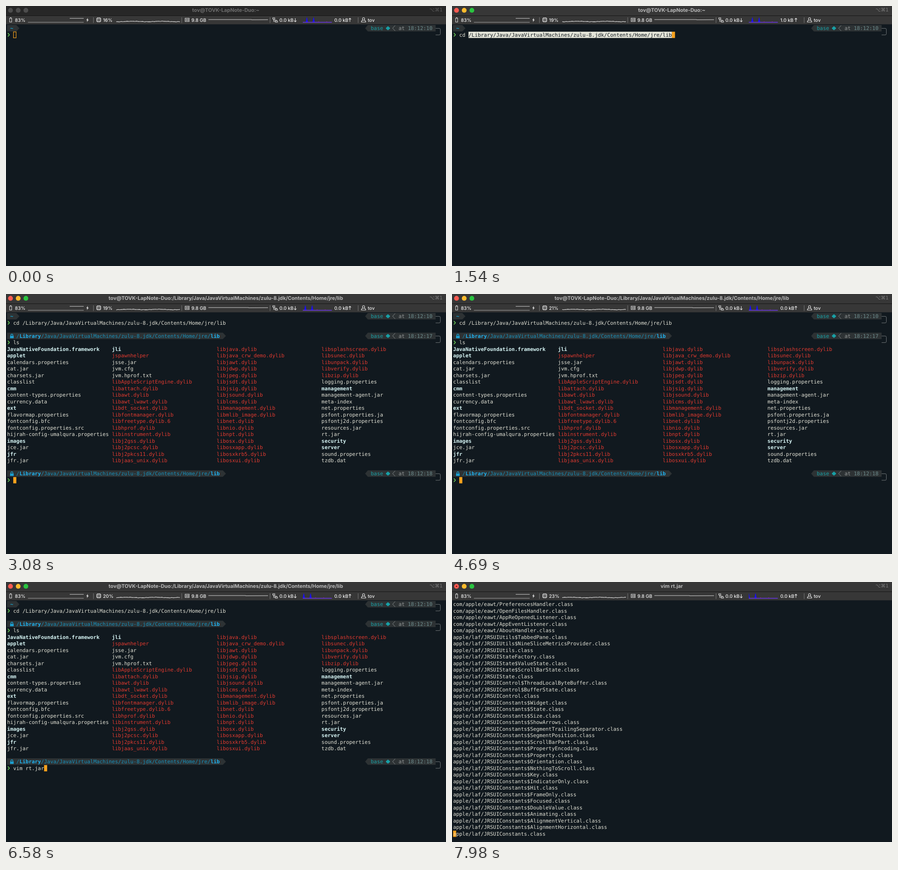
These frames come from a looping animation (974 by 575 pixels, 8 s). An HTML page with a canvas:

```html
<!DOCTYPE html>
<html lang="en">
<head>
<meta charset="utf-8">
<title>Terminal session</title>
<style>
html, body { margin: 0; width: 100%; height: 100%; overflow: hidden; background: #11191f; }
canvas { display: block; }
</style>
</head>
<body>
<canvas id="stage" width="974" height="575"></canvas>
<script>
const ctx = document.getElementById('stage').getContext('2d');
const LOOP = 8000, STEP = 70;
const CELL = 6.823, LINE = 14.5, LEFT = 2.4, TOP = 41.75;
const MONO = '11.333px "DejaVu Sans Mono", monospace';
const BG = '#11191f', FG = '#e2e2d6', RED = '#e03a30', ORANGE = '#f7a11c', SEGMENT = '#2d3234';
const USER = 'tov', HOST = 'TOVK-LapNote-Duo';
const PATH = '/Library/Java/JavaVirtualMachines/zulu-8.jdk/Contents/Home/jre/lib';

// Moments of the session in ms
const FOCUS = 350, PASTE = 1400, CD_DONE = 1960, LS_DONE = 2800;
const VIM_ENTER = 6650, VIM_CLEAR = 6720, VIM_READY = 6790, MODIFIED = 7210;
const CD_KEYS = [840, 980, 1120];
const LS_KEYS = [2310, 2450];
const VIM_KEYS = [5320, 5460, 5530, 5740, 5880, 6020, 6160, 6300, 6440, 6510];
const TICKS = [700, 1700, 2700, 3690, 4690, 5690, 6700, 7700];
const CPU = [16, 19, 19, 19, 20, 21, 20, 21, 23];

const LISTING = [
  'JavaNativeFoundation.framework applet calendars.properties cat.jar charsets.jar classlist cmm content-types.properties currency.data ext flavormap.properties fontconfig.bfc fontconfig.properties.src hijrah-config-umalqura.properties images jce.jar jfr jfr.jar',
  'jli jspawnhelper jsse.jar jvm.cfg jvm.hprof.txt libAppleScriptEngine.dylib libattach.dylib libawt.dylib libawt_lwawt.dylib libdt_socket.dylib libfontmanager.dylib libfreetype.dylib.6 libhprof.dylib libinstrument.dylib libj2gss.dylib libj2pcsc.dylib libj2pkcs11.dylib libjaas_unix.dylib',
  'libjava.dylib libjava_crw_demo.dylib libjawt.dylib libjdwp.dylib libjpeg.dylib libjsdt.dylib libjsig.dylib libjsound.dylib liblcms.dylib libmanagement.dylib libmlib_image.dylib libnet.dylib libnio.dylib libnpt.dylib libosx.dylib libosxapp.dylib libosxkrb5.dylib libosxui.dylib',
  'libsplashscreen.dylib libsunec.dylib libunpack.dylib libverify.dylib libzip.dylib logging.properties management management-agent.jar meta-index net.properties psfont.properties.ja psfontj2d.properties resources.jar rt.jar security server sound.properties tzdb.dat'
].map(column => column.split(' '));
const FOLDERS = new Set('JavaNativeFoundation.framework applet cmm ext images jfr jli management security server'.split(' '));

const classes = (prefix, names) => names.split(' ').map(name => prefix + name + '.class');
const VIM_LINES = [
  ...classes('com/apple/eawt/', 'PreferencesHandler OpenFilesHandler AppReOpenedListener AppEventListener AboutHandler'),
  ...classes('apple/laf/JRSUI', 'Utils$TabbedPane Utils$NineSliceMetricsProvider Utils StateFactory State$ValueState State$ScrollBarState State Control$ThreadLocalByteBuffer Control$BufferState Control'),
  ...classes('apple/laf/JRSUIConstants$', 'Widget State Size ShowArrows SegmentTrailingSeparator SegmentPosition ScrollBarPart PropertyEncoding Property Orientation NothingToScroll Key IndicatorOnly Hit FrameOnly Focused DoubleValue Animating AlignmentVertical AlignmentHorizontal'),
  'apple/laf/JRSUIConstants.class'
];

const colX = col => LEFT + col * CELL;
const rowY = row => TOP + row * LINE;
const passed = (times, t) => times.filter(time => time <= t).length;

function rect(x, y, w, h, color) {
  ctx.fillStyle = color;
  ctx.fillRect(x, y, w, h);
}
function disc(x, y, r, color) {
  ctx.fillStyle = color;
  ctx.beginPath();
  ctx.arc(x, y, r, 0, 7);
  ctx.fill();
}
function fill(points, color) {
  ctx.fillStyle = color;
  ctx.beginPath();
  points.forEach(p => ctx.lineTo(...p));
  ctx.fill();
}
function line(points, color, width = 1) {
  ctx.strokeStyle = color;
  ctx.lineWidth = width;
  ctx.beginPath();
  points.forEach(p => ctx.lineTo(...p));
  ctx.stroke();
}
function box(x, y, w, h, color = '#e6e6e6', width = 1) {
  ctx.strokeStyle = color;
  ctx.lineWidth = width;
  ctx.strokeRect(x, y, w, h);
}
function label(text, x, y, color, font, align = 'left') {
  ctx.font = font;
  ctx.textAlign = align;
  ctx.fillStyle = color;
  ctx.fillText(text, x, y);
}
function mono(text, col, row, color = FG, bold = false) {
  label(text, colX(col), rowY(row) + 11.25, color, (bold ? 'bold ' : '') + MONO);
}
function cursor(col, row) {
  rect(colX(col), rowY(row) + 0.6, CELL, 13.9, ORANGE);
}

function titleBar(t) {
  const active = t >= FOCUS;
  rect(0, 0, 974, 21.5, active ? '#373737' : '#272727');
  ['#fb5a51', '#fdbb2d', '#2ac440'].forEach((color, i) =>
    disc(10 + 17 * i, 9.4, 5.3, active ? color : '#4d4d4d'));
  if (t >= MODIFIED) disc(10, 9.4, 1.5, '#6b0d08');
  const title = t >= VIM_CLEAR ? 'vim rt.jar' : `${USER}@${HOST}:${t < CD_DONE ? '~' : PATH}`;
  label(title, 486.5, 13.2, active ? '#b9b9b9' : '#6e6e6e', 'bold 11.2px Inter, sans-serif', 'center');
  label('⌥⌘1', 966.5, 12.3, active ? '#7e7e7e' : '#5c5c5c', '10.5px "DejaVu Sans", sans-serif', 'right');
}

function icons() {
  const ink = '#e6e6e6';
  box(8, 27, 4.6, 8.5);
  rect(9, 25.2, 2.6, 1.3, ink);
  fill([[181.4, 26], [177.8, 31.6], [180, 31.6], [179, 36], [182.9, 30], [180.6, 30]], ink);

  box(201.5, 26.8, 7.6, 7.6, ink, 1.2);
  box(203.8, 29, 3, 3, '#bbb', 0.8);
  for (const d of [203, 205.3, 207.6]) {
    line([[d, 25.2], [d, 26.8]], ink);
    line([[d, 34.4], [d, 36]], ink);
    line([[200, d - 174.7], [201.5, d - 174.7]], ink);
    line([[209.1, d - 174.7], [210.6, d - 174.7]], ink);
  }

  box(396.5, 27, 9, 7.3);
  rect(398.6, 28.5, 1.6, 4.5, ink);
  rect(402, 28.5, 1.6, 4.5, ink);

  box(590.5, 26, 4.5, 3);
  box(596.5, 32.8, 4.5, 3);
  line([[592.7, 29], [592.7, 34.3], [596.5, 34.3]], ink);
  line([[592.7, 31.2], [598.7, 31.2], [598.7, 32.8]], ink);

  ctx.strokeStyle = ink;
  ctx.lineWidth = 1.1;
  ctx.beginPath();
  ctx.ellipse(791.5, 28.6, 2.4, 2.9, 0, 0, 7);
  ctx.moveTo(789.7, 31.2);
  ctx.quadraticCurveTo(786.6, 32.2, 786.6, 35.5);
  ctx.lineTo(796.4, 35.5);
  ctx.quadraticCurveTo(796.4, 32.2, 793.3, 31.2);
  ctx.stroke();
}

function arrow(x, direction) {
  const tip = 31 + 4 * direction;
  line([[x, 31 - 4 * direction], [x, tip]], '#f0f0f0', 1.1);
  line([[x - 2.6, tip - 2.6 * direction], [x, tip], [x + 2.6, tip - 2.6 * direction]], '#f0f0f0', 1.1);
}

function graphs(tick) {
  line([[48.5, 36], [172, 36]], '#a8a8a8');
  line([[141, 27.3], [172, 27.3]], '#d0d0d0');

  const cpu = [];
  for (let i = 0; i <= 60; i++) {
    const s = i + tick;
    cpu.push([244 + i * 2.35, 34.2 - 0.55 * Math.sin(s * 0.23 - 2) - 0.5 * Math.sin(s * 1.7) * Math.sin(s * 0.41)]);
  }
  line(cpu, '#e8e8e8', 1.1);

  line([[448, 30], [543 - tick * 2.2, 30], [544 - tick * 2.2, 30.5], [580, 30.3]], '#d8d8d8', 1.1);

  ctx.save();
  ctx.beginPath();
  ctx.rect(657, 24, 64.5, 14);
  ctx.clip();
  const shift = tick * 1.13;
  for (const x of [666, 681]) {
    fill([[x - 2.6 - shift, 36], [x - shift - 0.5, 25.5], [x - shift + 0.5, 25.5], [x + 2.6 - shift, 36]], '#1a10ee');
  }
  line([[657, 36], [721.5, 36]], '#6a37ec', 1.5);
  for (const x of [691, 709]) rect(x - shift, 34.3, 2, 1, '#a0207a');
  ctx.restore();
}

function statusBar(t) {
  const tick = passed(TICKS, t);
  const text = (s, x) => label(s, x, 34.8, '#f2f2f2', '500 10.3px Inter, sans-serif');
  rect(0, 21.5, 974, 19, '#373737');
  rect(0, 21, 974, 1, '#161616');
  for (const x of [193.5, 389, 584.5, 779.5]) line([[x, 25], [x, 37.5]], '#777');
  icons();
  graphs(tick);
  text('83%', 19.7);
  text(CPU[tick] + '%', 214.7);
  text('9.8 GB', 410.5);
  text('0.0 kB', 605.3);
  arrow(640.3, 1);
  text((tick === 1 ? '1.0' : '0.0') + ' kB', 726.7);
  arrow(761.3, -1);
  text(USER, 800.7);
}

function lock(y) {
  const color = '#1b9fd0';
  ctx.strokeStyle = color;
  ctx.lineWidth = 1.3;
  ctx.beginPath();
  ctx.arc(13, y - 1.6, 2.3, Math.PI, 0);
  ctx.lineTo(15.3, y + 0.5);
  ctx.moveTo(10.7, y - 1.6);
  ctx.lineTo(10.7, y + 0.5);
  ctx.stroke();
  rect(9, y - 0.2, 8, 5.4, color);
}

function prompt(row, time, home) {
  const top = rowY(row) + 0.2, mid = top + 7.2, bottom = top + 14.2;
  const end = colX(home ? 3 : 70);
  fill([[LEFT, top], [end, top], [end + CELL, mid], [end, bottom], [LEFT, bottom]], SEGMENT);
  if (home) {
    mono('~', 1, row, '#16a9d6', true);
  } else {
    lock(mid);
    mono('/', 3, row, '#1690bb');
    mono('Library', 4, row, '#1fb2f0', true);
    mono(PATH.slice(8, -3), 11, row, '#1690bb');
    mono('lib', 66, row, '#1fb2f0', true);
  }

  fill([[795, mid], [801, top], [951, top], [951, bottom], [801, bottom]], SEGMENT);
  mono('base', 118, row, '#18a0a6');
  for (const [dx, dy] of [[0, -2], [0, 2], [-2.3, 0], [2.3, 0]]) disc(845.5 + dx, mid + dy, 2.2, '#18a0a6');
  line([[861.5, top + 1], [855.8, mid], [861.5, bottom - 1]], '#858b8c');
  mono('at', 127, row, '#949898');
  mono(time, 130, row, '#6d8c8d');

  ctx.strokeStyle = '#72787a';
  ctx.lineWidth = 1;
  ctx.beginPath();
  ctx.moveTo(951, mid + 0.3);
  ctx.arcTo(961.5, mid + 0.3, 961.5, mid + 8, 2.5);
  ctx.arcTo(961.5, mid + 14.8, 951, mid + 14.8, 2.5);
  ctx.lineTo(951, mid + 14.8);
  ctx.stroke();

  const y = rowY(row + 1) + 7.4;
  line([[4.2, y - 3.8], [7.6, y], [4.2, y + 3.8]], '#6ccb58', 1.6);
}

// Draws a partly typed command; the cursor follows the last key.
function command(text, keys, row, t, done) {
  const typed = passed(keys, t);
  mono(text.slice(0, typed), 2, row);
  if (t < done) cursor(2 + typed, row);
}

function listing() {
  LISTING.forEach((column, c) => column.forEach((name, r) => {
    const folder = FOLDERS.has(name);
    const color = folder ? '#d5f4f4' : /dylib|helper/.test(name) ? RED : FG;
    mono(name, c * 34, r + 5, color, folder);
  }));
}

function shell(t) {
  prompt(0, '18:12:10', true);
  if (t < FOCUS) {
    box(colX(2) + 0.5, rowY(1) + 1, CELL - 1, 13.2, ORANGE, 1.2);
  } else if (t < PASTE) {
    command('cd ', CD_KEYS, 1, t, PASTE);
  } else {
    const selected = t < CD_DONE;
    mono('cd', 2, 1);
    if (selected) {
      rect(colX(5), rowY(1) + 0.6, PATH.length * CELL, 13.9, '#e3e4d8');
      cursor(5 + PATH.length, 1);
    }
    mono(PATH, 5, 1, selected ? BG : FG);
  }
  if (t >= CD_DONE) {
    prompt(3, '18:12:17');
    command('ls', LS_KEYS, 4, t, LS_DONE);
  }
  if (t >= LS_DONE) {
    listing();
    prompt(24, '18:12:18');
    command('vim rt.jar', VIM_KEYS, 25, t, VIM_ENTER);
  }
}

function vim(t) {
  if (t < VIM_READY) return;
  VIM_LINES.forEach((text, row) => mono(text, 0, row));
  cursor(0, 35);
  mono('a', 0, 35, '#fbdca6');
}

function frame(now) {
  const t = Math.floor((now % LOOP) / STEP) * STEP;
  rect(0, 0, 974, 575, BG);
  ctx.textRendering = 'geometricPrecision';
  (t < VIM_CLEAR ? shell : vim)(t);
  titleBar(t);
  statusBar(t);
  requestAnimationFrame(frame);
}
frame(performance.now());
</script>
</body>
</html>
```
